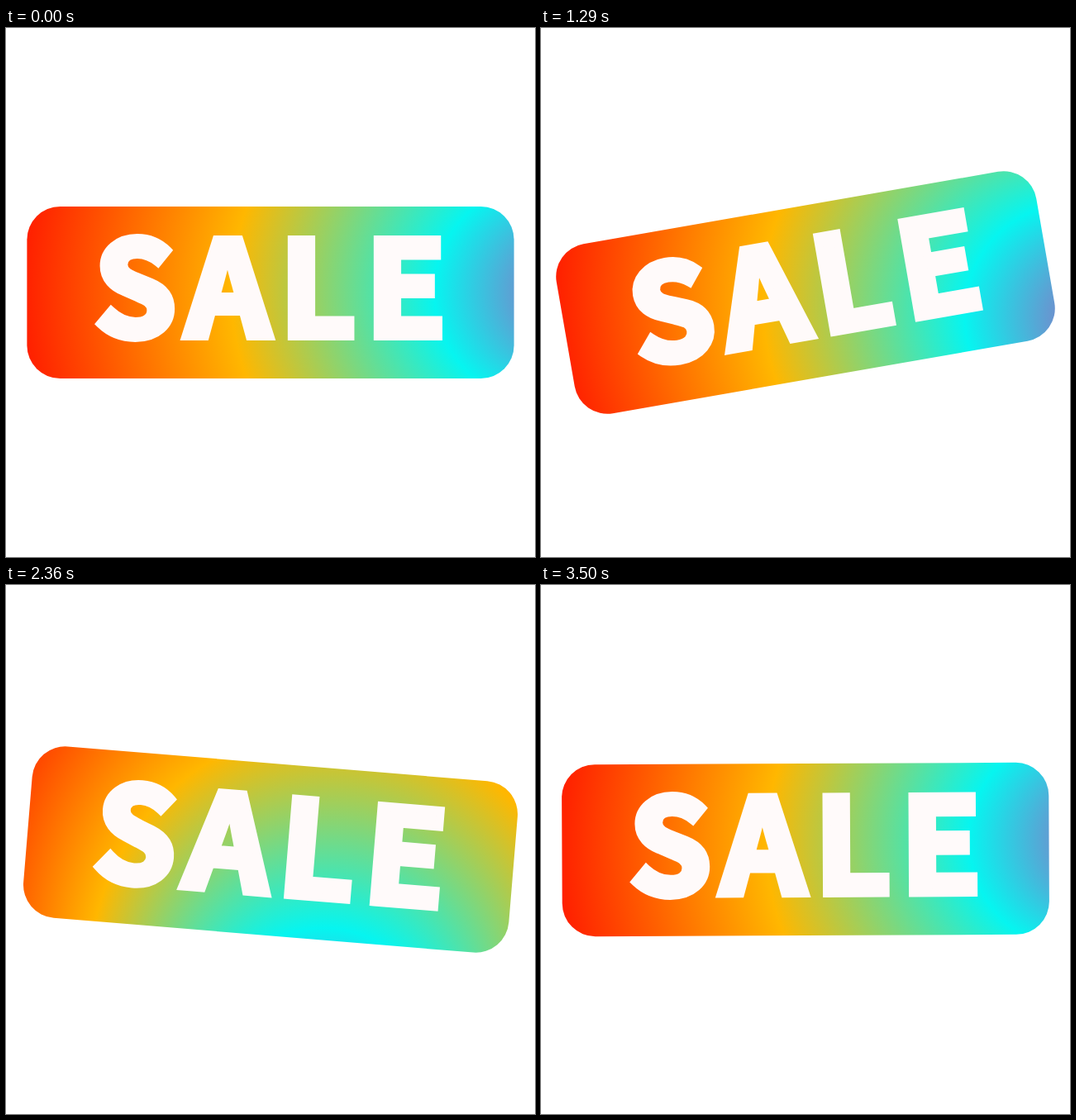
An HTML page for the animation above (3570 ms loop, 640 by 640 pixels).

```html
<!DOCTYPE html>
<html lang="en">
<head>
<meta charset="utf-8">
<title>Sale</title>
<style>
  html, body { margin: 0; width: 100%; height: 100%; overflow: hidden; background: #fff; }
  svg { display: block; width: 100vw; height: 100vh; }
  text {
    font-family: "Noto Sans CJK JP", "Noto Sans CJK SC", "Noto Sans CJK", "Noto Sans", sans-serif;
    font-weight: 700;
    font-size: 161px;
    fill: #fffafa;
    stroke: #fffafa;
    stroke-width: 10;
    stroke-linejoin: miter;
  }
</style>
</head>
<body>
<svg viewBox="0 0 640 640">
  <defs>
    <radialGradient id="glow" gradientUnits="userSpaceOnUse" cx="428" cy="320" r="585" fx="720" fy="320">
      <stop offset="0" stop-color="#be42b4"/>
      <stop offset=".23" stop-color="#06f5f0"/>
      <stop offset=".51" stop-color="#ffb700"/>
      <stop offset=".8" stop-color="#ff1e00"/>
    </radialGradient>
  </defs>
  <g id="card">
    <rect x="25.4" y="216" width="589.2" height="208" rx="40" fill="url(#glow)"/>
    <text id="label" x="105 217 330.5 434.5" y="373">SALE</text>
  </g>
</svg>
<script>
const card = document.getElementById('card');
const glow = document.getElementById('glow');
const label = document.getElementById('label');

const LOOP = 3570, FPS = 14, STEPS = 50;
const ORBIT = 292, CX = 428, CY = 320;

// Ease with horizontal end tangents: cubic-bezier(x1, 0, x2, 1)
function ease(x, x1, x2) {
  let lo = 0, hi = 1;
  for (let i = 0; i < 30; i++) {
    const p = (lo + hi) / 2, q = 1 - p;
    if (3 * p * q * q * x1 + 3 * p * p * q * x2 + p * p * p < x) lo = p;
    else hi = p;
  }
  return lo * lo * (3 - 2 * lo);
}

// Swing keys: step, degrees, easing towards the next key
const swing = [
  [0, 0, .42, .58],
  [10.6, 8, .42, .58],
  [20.6, -12.8, .42, .58],
  [30.4, 7.9, .42, .58],
  [40, -13, .27, .6],
  [50, 0]
];

function tilt(step) {
  const k = swing.findIndex((key, i) => step < swing[i + 1][0]);
  const [t0, a, x1, x2] = swing[k], [t1, b] = swing[k + 1];
  return a + (b - a) * ease((step - t0) / (t1 - t0), x1, x2);
}

// Place each letter by the centre of its ink
function setLabel() {
  const ctx = document.createElement('canvas').getContext('2d');
  const style = getComputedStyle(label);
  const ink = (ch, size) => {
    ctx.font = `700 ${size}px ${style.fontFamily}`;
    return ctx.measureText(ch);
  };
  const size = 118 * 500 / ink('E', 500).actualBoundingBoxAscent;
  const centers = [156.3, 268.5, 381, 486.5];
  const xs = [...'SALE'].map((ch, i) => {
    const m = ink(ch, size);
    return centers[i] - (m.actualBoundingBoxRight - m.actualBoundingBoxLeft) / 2;
  });
  label.style.fontSize = size + 'px';
  label.setAttribute('x', xs.join(' '));
}

function draw(ms) {
  const step = Math.floor((ms % LOOP + 6) * FPS / 1000) % STEPS;
  const turn = 2 * Math.PI * ease(step / STEPS, .96, .85);
  glow.setAttribute('fx', CX + ORBIT * Math.cos(turn));
  glow.setAttribute('fy', CY + ORBIT * Math.sin(turn));
  card.setAttribute('transform', `rotate(${tilt(step)} 320 320)`);
}

setLabel();
const start = performance.now();
function tick() {
  draw(performance.now() - start);
  requestAnimationFrame(tick);
}
tick();
</script>
</body>
</html>
```
